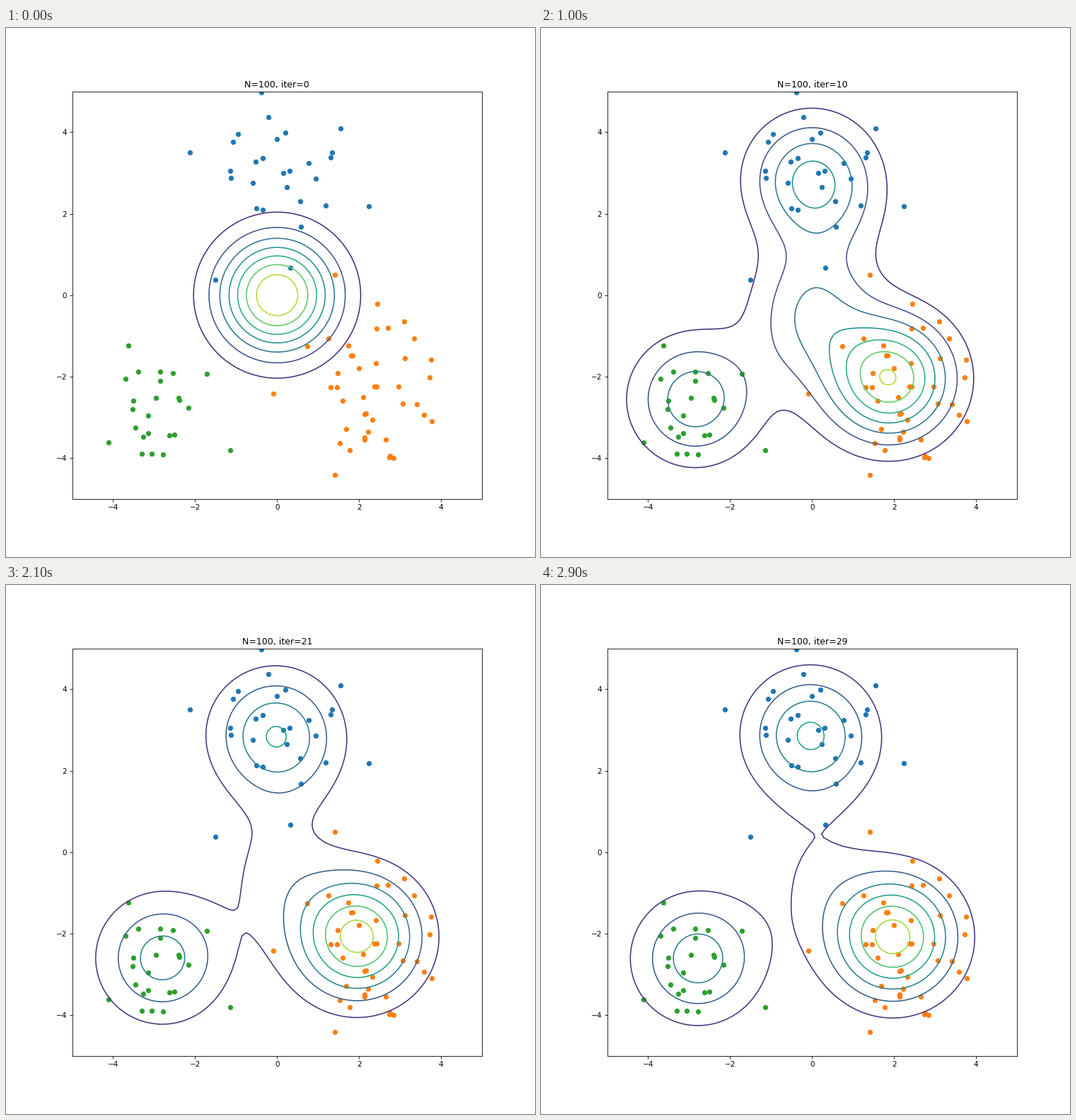
A matplotlib script that plays this animation: 748x748 px, repeating every 3000 ms.

```python
import numpy as np
import matplotlib.pyplot as plt
from matplotlib.animation import FuncAnimation

FRAMES, INTERVAL = 30, 100

# Each cluster of the fitted density: final share, rate and start of its
# growth, final centre, early offset of the centre, variance
CLUSTERS = [
    dict(share=.262, rate=.125, start=-2, end=(-.07, 2.9), drift=(.6, -.2), var=1.03),
    dict(share=.406, rate=.21, start=1.05, end=(2.02, -2.11), drift=(-1, .7), var=1.05),
    dict(share=.228, rate=.11, start=-5.45, end=(-2.75, -2.64), drift=(-1.1, .9), var=1.07),
]

# Early samples of the running average: first iteration, weight, x, y
EARLY = [(0, 1, 0, 0), (1, .88, 0, -1), (2, .45, .45, 1.85), (2, .15, .5, -2.7)]

axis = np.linspace(-5, 5, 100)
X, Y = np.meshgrid(axis, axis)
rng = np.random.default_rng(5)


def scatter_group(count, center, radii, outliers):
    """A few fixed outliers around an evenly filled ellipse of dots."""
    inner = count - len(outliers)
    angle = rng.uniform(0, 2 * np.pi, inner)
    radius = np.sqrt(rng.uniform(0, 1, inner))
    disc = np.column_stack([np.cos(angle), np.sin(angle)]) * radius[:, None]
    dots = np.vstack([disc * radii + center, outliers])
    ax.scatter(dots[:, 0], dots[:, 1])


def bump(weight, x, y, var=1):
    return weight * np.exp(-((X - x) ** 2 + (Y - y) ** 2) / (2 * var))


def density(it):
    # Early samples fade as 1 / n while the clusters grow to their share.
    n = it + 1
    total = sum(bump(w / n, x, y) for first, w, x, y in EARLY if it >= first)
    for c in CLUSTERS:
        growth = max(0, 1 - np.exp(-c["rate"] * (it - c["start"])))
        growth *= min(it / 2, 1)
        x, y = np.array(c["end"]) + np.array(c["drift"]) / n
        total = total + bump(c["share"] * growth, x, y, c["var"])
    return total / (2 * np.pi)


fig, ax = plt.subplots(figsize=(10, 10), dpi=74.8)
scatter_group(28, (.1, 3), (1.5, 1.5),
              [(-.38, 4.97), (1.55, 4.1), (-2.12, 3.5), (2.23, 2.19),
               (.33, .68), (-1.5, .37)])
scatter_group(43, (2.35, -2.2), (1.4, 2),
              [(1.4, .5), (3.76, -1.59), (3.78, -3.1), (1.4, -4.41),
               (-.1, -2.42), (.74, -1.26)])
scatter_group(24, (-3, -2.8), (.9, 1.3),
              [(-3.62, -1.24), (-1.71, -1.93), (-4.11, -3.62), (-1.14, -3.8)])
ax.set_xlim(-5, 5)
ax.set_ylim(-5, 5)
ax.set_xticks(range(-4, 5, 2))
ax.set_yticks(range(-4, 5, 2))
title = ax.set_title("")
drawn = []


def update(it):
    while drawn:
        drawn.pop().remove()
    drawn.append(ax.contour(X, Y, density(it)))
    title.set_text(f"N=100, iter={it}")
    return [title]


anim = FuncAnimation(fig, update, frames=FRAMES, interval=INTERVAL,
                     repeat=True, repeat_delay=0, blit=False)
plt.show()
```
